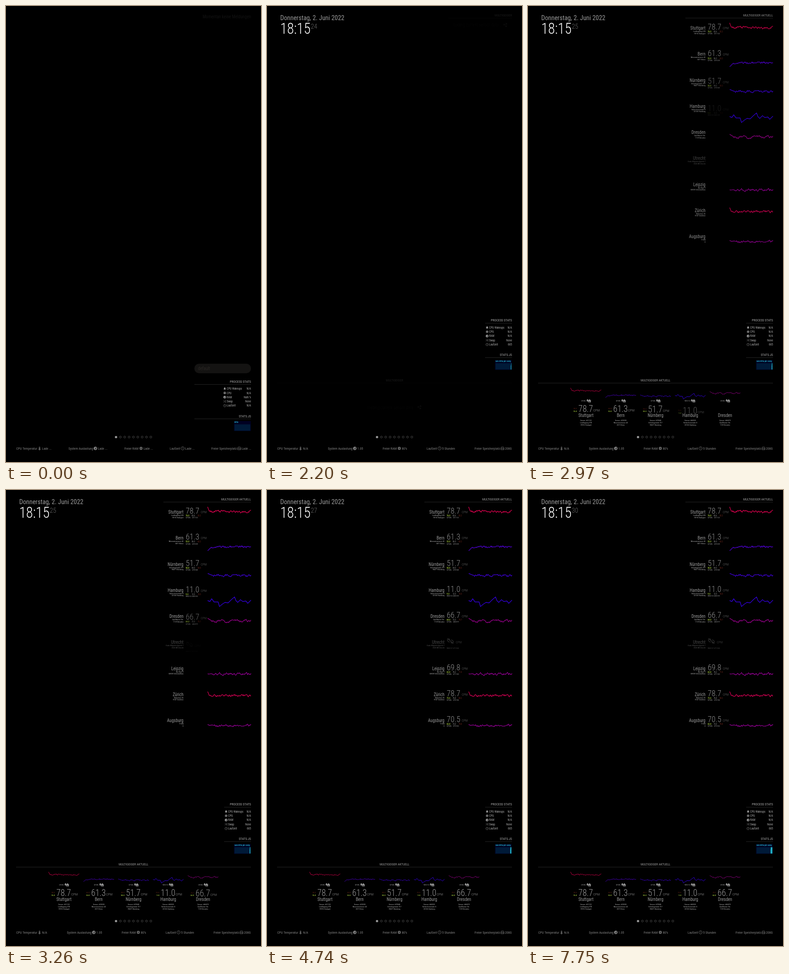
Recreate the animation shown at these times as an HTML page with a canvas. Size 559 by 1002 pixels, loop 8000 ms.

```html
<!DOCTYPE html>
<html lang="de">
<head>
<meta charset="utf-8">
<title>Dashboard</title>
<style>
html, body { margin: 0; width: 100%; height: 100%; overflow: hidden; background: #000; }
canvas { display: block; }
</style>
</head>
<body>
<canvas id="stage" width="559" height="1002"></canvas>
<script>
const ctx = document.getElementById('stage').getContext('2d');
const LOOP = 8000;
const RIGHT = 537;
const FONT = '"Roboto Condensed", Roboto, sans-serif';

// One condensing factor for the whole typeface.
function widthOf(family) {
  ctx.font = `40px ${family}`;
  return ctx.measureText('Donnerstag 0123').width;
}
const NARROW = 0.84 * widthOf('Roboto, sans-serif') / widthOf(FONT);

const clamp = v => Math.max(0, Math.min(1, v));
const easeOut = p => 1 - (1 - p) ** 2;
const ramp = (t, start, length) => clamp((t - start) / length);

// y is the middle of the capital letters.
function text(str, x, y, size, color, align = 'left', weight = 400) {
  ctx.save();
  ctx.translate(x, y + size * 0.355);
  ctx.scale(NARROW, 1);
  ctx.font = `${weight} ${size}px ${FONT}`;
  ctx.textAlign = align;
  ctx.fillStyle = color;
  ctx.fillText(str, 0, 0);
  ctx.restore();
}

function rule(x1, x2, y) {
  ctx.fillStyle = '#2e2e2e';
  ctx.fillRect(x1, y, x2 - x1, 0.8);
}

function fade(alpha, draw) {
  if (alpha <= 0) return;
  ctx.save();
  ctx.globalAlpha *= alpha;
  draw();
  ctx.restore();
}

// Icons on a 16 unit grid: filled part, stroked part.
const ICONS = {
  bell: ['M8 1a4.5 4.5 0 0 0-4.5 5v3L1 12h14l-2.5-3V6A4.5 4.5 0 0 0 8 1ZM6 13.2h4a2 2 0 0 1-4 0Z', ''],
  chip: ['M3 3h10v10H3ZM6 6h4v4H6Z', 'M5 1v2M8 1v2M11 1v2M5 13v2M8 13v2M11 13v2M1 5h2M1 8h2M1 11h2M13 5h2M13 8h2M13 11h2'],
  gauge: ['M8 .3a7.7 7.7 0 1 0 .01 0ZM6.6 11 10.5 4l1.4.8L9.4 12.4Z', ''],
  shuffle: ['', 'M1 4h3l7 8h3M1 12h3l2-2.3M9 6l2-2h3M12 1.5 14.5 4 12 6.5M12 9.5l2.5 2.5-2.5 2.5'],
  clock: ['', 'M8 .8a7.2 7.2 0 1 0 .01 0ZM8 4v4.2l2.5 1.6'],
  thermo: ['M8 10a2 2 0 1 0 .01 0Z', 'M6 9V3a2 2 0 0 1 4 0v6a3.6 3.6 0 1 1-4 0ZM8 5v7'],
  disk: ['', 'M1 9 3 2.5h10L15 9v5H1ZM1 9h14M10 11.5h2'],
  tree: ['M8 0 14 7H11L14 11H9v5H7v-5H2l3-4H2Z', ''],
  house: ['M8 0 16 8H14v8H2V8H0ZM6 10h4v4H6Z', ''],
  unlink: ['', 'M7 5a3 3 0 0 0-5-1 3 3 0 0 0 1 5l3 2M9 11a3 3 0 0 0 5 1 3 3 0 0 0-1-5l-3-2M1 2l14 12']
};
for (const key in ICONS) ICONS[key] = ICONS[key].map(d => new Path2D(d));

function icon(name, x, y, size, color) {
  const [solid, line] = ICONS[name];
  ctx.save();
  ctx.translate(x - size / 2, y - size / 2);
  ctx.scale(size / 16, size / 16);
  ctx.fillStyle = ctx.strokeStyle = color;
  ctx.lineWidth = 1.5;
  ctx.fill(solid, 'evenodd');
  ctx.stroke(line);
  ctx.restore();
}

function radiation(x, y, turn) {
  ctx.fillStyle = '#3c3c3c';
  for (let i = 0; i < 3; i++) {
    const a = turn + i * Math.PI * 2 / 3;
    ctx.beginPath();
    ctx.arc(x, y, 4.6, a, a + Math.PI / 3);
    ctx.arc(x, y, 1.5, a + Math.PI / 3, a, true);
    ctx.fill();
  }
  ctx.beginPath();
  ctx.arc(x, y, 0.9, 0, 7);
  ctx.fill();
}

// base / low: chart height in the list and in the bottom bar; lead: offset and share of the opening stretch.
const SENSORS = [
  { city: 'Stuttgart', street: 'Lindhagweg 57B', zip: '70192 Stuttgart', id: 31122, cpm: '78.7', stats: ['76.0', '83.6', '92.2'], hue: '#c90047', base: 47.5, low: 845.5, lead: [-10, 0.04] },
  { city: 'Bern', street: 'Moosrainstrasse 42', zip: '3071 Köniz', id: 39228, cpm: '61.3', stats: ['53.0', '56.5', '63.2'], hue: '#4700bd', base: 125, low: 855.5, lead: [9, 0.09] },
  { city: 'Nürnberg', street: 'Erlenhagstraße 317', zip: '90471 Nürnberg', id: 70948, cpm: '51.7', stats: ['50.8', '54.5', '59.5'], hue: '#3900c6', base: 188, low: 857.5, lead: [-4, 0.12] },
  { city: 'Hamburg', street: 'Reiherfennstraße 8', zip: '22126 Hamburg', id: 68359, cpm: '11.0', stats: ['9.0', '12.5', '15.5'], tube: 'WKD-53', hue: '#3000d2', base: 245, low: 857 },
  { city: 'Dresden', street: 'Quellhainer Str.', zip: '1139 Dresden', id: 46879, cpm: '66.7', stats: ['64.0', '72.5', '79.7'], hue: '#8c0080', base: 288, low: 851, lead: [-6, 0.1] },
  { city: 'Utrecht', street: 'Oude Wilgenhofgracht 7', zip: '3526 KB Utrecht', id: 71364, tube: 'WKD-57' },
  { city: 'Leipzig', street: 'Am Rain 9', zip: '04538 Schönwölkau', id: 71180, cpm: '69.8', stats: ['63.8', '70.3', '71.9'], hue: '#870087', base: 404, lead: [0, 0.1] },
  { city: 'Zürich', street: 'Nebelrain 26', zip: '8147 Zumikon', id: 70784, cpm: '78.7', stats: ['72.6', '76.8', '84.2'], hue: '#c1004b', base: 452, lead: [-9, 0.04] },
  { city: 'Augsburg', street: 'F 62A', zip: 'S', id: 73366, cpm: '70.5', stats: ['62.8', '72.0', '79.8'], hue: '#870087', base: 518, lead: [-3, 0.06] }
];

function randomizer(seed) {
  return () => (seed = (seed * 16807) % 2147483647) / 2147483647;
}

function makeCurve(lead, seed) {
  const rnd = randomizer(seed * 7919 + 31);
  const points = [];
  const count = 80;
  let v = 0;
  for (let i = 0; i <= count; i++) {
    const x = i / count;
    v = v * 0.6 + (rnd() - 0.5) * 4.2;
    const start = lead[0] * (1 - x / lead[1]);
    points.push([x, x < lead[1] ? start + v * 0.25 : v]);
  }
  return points;
}

const SPARSE = [[0, -2], [5, 0], [9, -6], [14, 1], [23, 1], [26, 11], [32, 6], [38, 2], [45, 3], [52, -4],
  [59, -10], [62, -2], [66, 2], [72, -4], [77, 0], [84, -1], [88, 4], [95, -3]].map(([x, y]) => [x / 95, y]);
SENSORS.forEach((s, i) => {
  if (s.cpm) s.curve = s.lead ? makeCurve(s.lead, i + 1) : SPARSE;
});

function chart(s, x, y, width, scale, weight) {
  ctx.beginPath();
  for (const [px, py] of s.curve) ctx.lineTo(x + px * width, y + py * scale);
  ctx.strokeStyle = s.hue;
  ctx.lineWidth = weight;
  ctx.lineJoin = 'round';
  ctx.stroke();
}

const GREEN = '#a4c83c', RED = '#74281c', FINE = '#c0c0c0';
const tubeOf = s => s.tube || 'QP48L';

function listRow(s, i, t, wide) {
  const y = 48.5 + i * (wide ? 57.25 : 35.75);
  const dx = wide ? 0 : 95.5;
  const nameX = 389 + dx, x = 394 + dx;
  fade(s.cpm ? 1 : 0.46, () => {
    text(s.city, nameX, y, 10, '#999', 'right');
    text(s.street, nameX, y + 7, 4.3, FINE, 'right');
    text(s.zip, nameX, y + 11.5, 4.3, FINE, 'right');
  });
  if (wide && s.cpm) chart(s, 442, s.base, 95, 1, 1.4);

  const p = ramp(t, 2480 + i * 150, 400);
  fade(easeOut(p), () => {
    ctx.translate(0, 8 * (1 - p));
    if (s.cpm) {
      text(s.cpm, x, y - 3, 18.4, '#8c8c8c', 'left', 300);
      text('CPM', x + 33, y, 7.2, '#484848');
      text(s.stats[0], x, y + 8, 4.5, GREEN, 'left', 700);
      text(s.stats[1], x + 13, y + 8, 4.5, '#999');
      text(s.stats[2], x + 26, y + 8, 4.5, RED);
    } else {
      icon('unlink', x + 8, y - 3, 15, '#2a2a2a');
      text('CPM', x + 20, y, 7.2, '#303030');
    }
    const tone = s.cpm ? '#999' : '#444';
    text(tubeOf(s), x, y + 12.3, 4.4, tone);
    text('#' + s.id, x + 14, y + 12.3, 4.4, tone);
  });
}

function barColumn(s, i, t, wide) {
  const x = 127 + i * 76.25;
  const dy = wide ? 0 : -12;
  if (wide) chart(s, x - 33.5, s.low, 67, 0.6, 1);
  text(tubeOf(s), x, 868 + dy, 4.2, '#999', 'right');
  icon('tree', x + 3.5, 867 + dy, 6.5, '#999');
  icon('house', x + 8, 867.5 + dy, 7, '#999');
  text(s.city, x, 899.5 + dy, 10, '#999', 'center');
  text('Sensor: #' + s.id, x, 911 + dy, 4.2, FINE, 'center');
  text(s.street, x, 915.5 + dy, 4.2, FINE, 'center');
  text(s.zip, x, 920.3 + dy, 4.2, FINE, 'center');

  const p = easeOut(ramp(t, 2390 + i * 150, 400));
  fade(p, () => {
    ctx.translate(0, dy + 9 * (1 - p));
    text(s.cpm, x - 0.5, 885, 19.8, '#999', 'center', 300);
    text('CPM', x + 16, 888, 8, '#666');
    text(s.stats[2], x - 20, 884.5, 4.4, RED, 'right');
    text(s.stats[0], x - 20, 890, 4.4, GREEN, 'right', 700);
  });
}

function sensorList(t, wide) {
  text('MULTIGEIGER AKTUELL', RIGHT, 20, 7.4, '#999', 'right');
  rule(wide ? 345 : 440, RIGHT, 26);
  SENSORS.forEach((s, i) => listRow(s, i, t, wide));
}

function sensorBar(t, wide) {
  text('MULTIGEIGER AKTUELL', 279.5, 822.8, 7.4, '#999', 'center');
  rule(22, RIGHT, 828.3);
  SENSORS.slice(0, 5).forEach((s, i) => barColumn(s, i, t, wide));
}

function sensors(t) {
  const wide = t >= 2850;
  fade(easeOut(ramp(t, 2410, 800)), () => sensorList(t, wide));
  fade(easeOut(ramp(t, 2410, 600)), () => sensorBar(t, wide));
}

function loading(t) {
  const out = (1 - ramp(t, 1950, 420)) ** 2;
  fade(easeOut(ramp(t, 300, 790)) * out, () => {
    const turn = t / 2000 * Math.PI * 2;
    const note = 'loading current sensor data ...';
    text('MULTIGEIGER', RIGHT, 20, 7.4, '#999', 'right');
    rule(397, RIGHT, 26);
    text(note, 407, 41.5, 10, '#282828', 'left', 300);
    radiation(523, 41.5, turn);
    text('MULTIGEIGER', 279.5, 822.8, 7.4, '#999', 'center');
    rule(22, RIGHT, 828.3);
    text(note, 219.5, 882, 10, '#282828', 'left', 300);
    radiation(334.8, 881.5, turn);
  });
}

function clock(t) {
  const seconds = 23 + Math.floor((t - 670) / 1000);
  fade(easeOut(ramp(t, 300, 700)), () => {
    text('Donnerstag, 2. Juni 2022', 29, 25.8, 15, '#999');
    text('18:15', 29, 49.7, 32.5, '#fff', 'left', 300);
    text(String(seconds), 96, 44.8, 15.2, '#666', 'left', 300);
  });
}

const FPS = [67, 121, 120, 120, 118, 120, 119, 119];

function meter(t, y) {
  const count = Math.max(0, Math.floor((t + 260) / 1000));
  const x = 499.7;
  ctx.fillStyle = '#002';
  ctx.fillRect(x, y, 37, 22);
  ctx.fillStyle = '#001a38';
  ctx.fillRect(x + 1.2, y + 7.3, 34.6, 13.9);
  ctx.fillStyle = '#2ce4f4';
  for (let i = 0; i < count; i++) {
    const h = 13.9 * Math.min(1, FPS[i] / 100);
    ctx.fillRect(x + 35.8 - (count - i) * 0.47, y + 21.2 - h, 0.5, h);
  }
  const top = count > 1 ? 121 : 67;
  ctx.font = 'bold 4.25px "Liberation Sans", sans-serif';
  ctx.fillText(count ? `${FPS[count - 1]} FPS (67-${top})` : 'FPS', x + 1, y + 4.2);
}

function processStats(t) {
  const early = t < 320, known = t >= 130;
  const left = early ? 413 : 478;
  const x = early ? 479.5 : 482.5;
  const rows = [
    ['bell', 'CPU Wakeups', 'N/A'],
    ['chip', 'CPU', 'N/A'],
    ['gauge', 'RAM', known ? 'N/A' : 'NaN %'],
    ['shuffle', 'Swap', 'None'],
    ['clock', 'Laufzeit', known ? '665' : 'N/A']
  ];
  ctx.save();
  if (!early) ctx.translate(0, -134.4);
  text('PROCESS STATS', RIGHT, 825, 7.4, '#aaa', 'right');
  rule(left, RIGHT, 831);
  rows.forEach(([name, label, value], i) => {
    const y = 841 + i * 9.3;
    icon(name, x, y, 6.2, '#999');
    text(label, x + 4.5, y, 6.4, '#aaa');
    text(value, RIGHT, y, 6.4, '#aaa', 'right');
  });
  text('STATS.JS', RIGHT, 901, 7.4, '#aaa', 'right');
  rule(left, RIGHT, 906.7);
  meter(t, 912);
  ctx.restore();
}

function notices() {
  text('Momentan keine Meldungen', RIGHT, 23, 10, '#121212', 'right');
  ctx.fillStyle = '#141312';
  ctx.beginPath();
  ctx.roundRect(413, 786, 124, 21, 10);
  ctx.fill();
  text('default', 421, 796.8, 10, '#2b2825');
}

// Icon, label, value, start while waiting, start when known, icon offset.
const FOOTER = [
  ['thermo', 'CPU Temperatur', 'N/A', 22.5, 22.5, 51],
  ['gauge', 'System Auslastung', '1.05', 137, 133.5, 59],
  ['chip', 'Freier RAM', '80%', 259.5, 253.5, 36.5],
  ['clock', 'Laufzeit', '5 Stunden', 359, 350, 28.3],
  ['disk', 'Freier Speicherplatz', '208G', 450, 455, 61.2]
];

function footer(t) {
  const known = t >= 70;
  for (const [name, label, value, wait, ready, gap] of FOOTER) {
    const x = known ? ready : wait;
    text(label, x, 972.3, 7.5, '#808080');
    icon(name, x + gap, 972, 8, '#808080');
    text(known ? value : 'Lade ...', x + gap + 5.5, 972.3, 7.5, '#808080');
  }
}

function pager() {
  for (let i = 0; i < 9; i++) {
    ctx.beginPath();
    ctx.arc(241.2 + i * 9.54, 947.2, i ? 2.1 : 2.5, 0, 7);
    ctx.fillStyle = '#999';
    ctx.strokeStyle = '#666';
    ctx.lineWidth = 0.7;
    if (i) ctx.stroke(); else ctx.fill();
  }
}

function render(t) {
  ctx.fillStyle = '#000';
  ctx.fillRect(0, 0, 559, 1002);
  if (t < 320) notices();
  else clock(t);
  if (t >= 320 && t < 2370) loading(t);
  if (t >= 2480) sensors(t);
  processStats(t);
  pager();
  footer(t);
}

const began = performance.now();
function tick() {
  render((performance.now() - began) % LOOP);
  requestAnimationFrame(tick);
}
tick();
</script>
</body>
</html>
```
